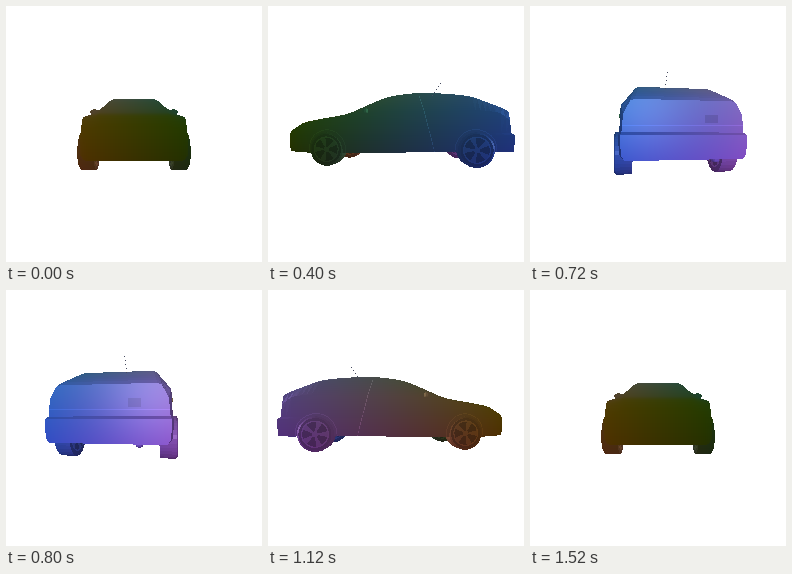
An HTML page with a canvas that plays this animation: 256 by 256 pixels, repeating every 1600 ms.

```html
<!DOCTYPE html>
<html lang="en">
<head>
<meta charset="utf-8">
<title>Turning car</title>
<style>
html, body { margin: 0; width: 100%; height: 100%; overflow: hidden; background: #fff; }
canvas { display: block; width: 100vw; height: 100vh; }
</style>
</head>
<body>
<canvas id="stage" width="256" height="256"></canvas>
<script>
const SIZE = 256, FOCAL = 128 / Math.tan(Math.PI / 6);
const STEP = 80, STEPS = 20, TURN = 2 * Math.PI / (STEPS - 1);
const ctx = document.getElementById('stage').getContext('2d');
const img = ctx.createImageData(SIZE, SIZE);
const px = new Uint32Array(img.data.buffer);
const zbuf = new Float32Array(SIZE * SIZE);

const sub = (a, b) => [a[0] - b[0], a[1] - b[1], a[2] - b[2]];
const dot = (a, b) => a[0] * b[0] + a[1] * b[1] + a[2] * b[2];
const cross = (a, b) => [a[1] * b[2] - a[2] * b[1], a[2] * b[0] - a[0] * b[2], a[0] * b[1] - a[1] * b[0]];
const unit = a => { const l = Math.hypot(...a) || 1; return a.map(v => v / l); };

// Smooth curve through [x, y] points.
function curve(p) {
  const slope = i => {
    const a = p[Math.max(i - 1, 0)], b = p[Math.min(i + 1, p.length - 1)];
    return (b[1] - a[1]) / (b[0] - a[0]);
  };
  return x => {
    let i = 0;
    while (i < p.length - 2 && x > p[i + 1][0]) i++;
    const [x0, y0] = p[i], [x1, y1] = p[i + 1], h = x1 - x0;
    const t = Math.min(1, Math.max(0, (x - x0) / h)), u = 1 - t;
    return u * u * (1 + 2 * t) * y0 + t * u * u * h * slope(i)
      + t * t * (3 - 2 * t) * y1 - t * t * u * h * slope(i + 1);
  };
}

// Axes: x to the car's left, y up, z to its front.
const REAR = -.43, NOSE = .43;
const roof = curve([[-.43, .088], [-.41, .1], [-.36, .122], [-.3, .146], [-.2, .161], [-.1, .166],
  [0, .156], [.06, .138], [.13, .105], [.19, .081], [.3, .062], [.39, .045], [.43, .02]]);
const belt = curve([[-.43, .05], [-.38, .08], [-.2, .082], [.1, .078], [.2, .066], [.35, .04], [.43, .01]]);
const crown = curve([[-.43, .142], [-.36, .13], [-.2, .107], [-.05, .1], [.06, .108], [.15, .128], [.3, .122], [.43, .09]]);
const wide = curve([[-.43, .168], [-.38, .173], [-.2, .175], [.25, .175], [.36, .158], [.41, .14], [.43, .118]]);
const sill = curve([[-.43, -.066], [0, -.07], [.3, -.074], [.43, -.07]]);

const faces = [];
function face(a, b, c, inner, wheel) {
  let n = cross(sub(b, a), sub(c, a));
  if (Math.hypot(...n) < 1e-9) return;
  n = unit(n);
  const mid = [0, 1, 2].map(i => (a[i] + b[i] + c[i]) / 3);
  if (dot(n, sub(mid, inner)) < 0) n = n.map(v => -v);
  faces.push({ pts: [a, b, c], n, wheel });
}
function skin(r, s, inner, wheel) {
  r.forEach((a, i) => {
    const j = (i + 1) % r.length;
    face(a, r[j], s[i], inner, wheel);
    face(r[j], s[j], s[i], inner, wheel);
  });
}
function fan(r, c, inner, wheel) {
  r.forEach((a, i) => face(a, r[(i + 1) % r.length], c, inner, wheel));
}

function section(z) {
  const t = roof(z), b = belt(z), c = crown(z), w = wide(z), f = sill(z);
  const half = [[w * .93, f], [w * .98, f + .012], [w, -.003], [w * .975, Math.min(.004, b - .006)],
    [w * .95, b], [c, t - .004], [c * .92, t]];
  const ring = [...half, [0, t], ...half.map(([x, y]) => [-x, y]).reverse(), [0, f]];
  return ring.map(([x, y]) => [x, y, z < -.39 && y < 0 ? z - .012 : z]);
}

function body() {
  const rings = [];
  for (let i = 0; i <= 48; i++) rings.push(section(REAR + (NOSE - REAR) * i / 48));
  for (let i = 0; i < 48; i++) skin(rings[i], rings[i + 1], [0, .02, rings[i][4][2] * .85]);
  // Tail closed by flat strips from side to side.
  const tail = rings[0];
  for (let i = 0; i < 6; i++) {
    const a = tail[i], b = tail[i + 1], c = tail[14 - i], d = tail[13 - i];
    face(a, b, c, [0, a[1], 0]);
    face(b, c, d, [0, a[1], 0]);
  }
  fan(rings[48], [0, -.015, NOSE + .008], [0, 0, 0]);
}

function wheel(side, z, out) {
  const y = -.058, rad = .064, hub = { y, z, rad };
  const ring = (x, r) => Array.from({ length: 32 }, (_, i) => {
    const a = i * Math.PI / 16;
    return [side * x, y + r * Math.sin(a), z + r * Math.cos(a)];
  });
  const inn = out - .052, core = [side * (out - .03), y, z];
  const edge = ring(out - .005, rad), rim = ring(out, rad * .9), back = ring(inn, rad);
  skin(back, edge, core, hub);
  skin(edge, rim, core, hub);
  fan(rim, [side * out, y, z], core, hub);
  fan(back, [side * inn, y, z], core, hub);
}

function blob(c, r) {
  const ring = k => Array.from({ length: 12 }, (_, i) => {
    const a = i * Math.PI / 6, b = (k / 6 - .5) * Math.PI;
    return [c[0] + r[0] * Math.cos(b) * Math.cos(a), c[1] + r[1] * Math.sin(b), c[2] + r[2] * Math.cos(b) * Math.sin(a)];
  });
  for (let k = 0; k < 6; k++) skin(ring(k), ring(k + 1), c);
}

body();
for (const s of [1, -1]) {
  wheel(s, .252, .177);
  wheel(s, -.305, .185);
  blob([s * .16, .088, .105], [.017, .012, .012]);
}
blob([-.085, -.07, -.42], [.01, .006, .02]);

// Fine marks: spokes, seams and rear panels.
function detail(p, n, hub) {
  const [x, y, z] = p;
  if (hub) {
    const dy = y - hub.y, dz = z - hub.z, r = Math.hypot(dy, dz) / hub.rad;
    if (Math.abs(n[0]) < .9) return .95;
    if (r > .76) return .88;
    if (r > .69) return 1.15;
    return r < .16 || Math.cos(5 * Math.atan2(dy, dz)) > .35 ? 1.1 : .82;
  }
  if (n[2] < -.7 && z < -.4) {
    if (Math.abs(y - .022) < .0014) return 1.12;
    if (x < -.055 && x > -.09 && y > .028 && y < .05) return .88;
  }
  if (Math.abs(n[0]) > .5) {
    if (Math.abs(z + .14 - y * .25) < .0012) return 1.35;
    for (const c of [.252, -.305])
      if (Math.abs(Math.hypot(y + .058, z - c) - .074) < .0016) return 1.15;
  }
  return 1;
}

const LAMP = [0, .25, -2];
function shade(p, n, eye, hub) {
  const l = unit(sub(LAMP, p)), nl = dot(n, l);
  let lit = .5, gloss = 0;
  if (nl > 0) {
    lit += .3 * nl;
    const v = unit(sub(eye, p)), r = n.map((k, i) => 2 * nl * k - l[i]);
    gloss = 34 * Math.pow(Math.max(0, dot(r, v)), 20);
  }
  lit *= 255 * detail(p, n, hub);
  const r = lit * (.23 + .43 * (.18 - p[0]) / .36) + gloss;
  const g = lit * (.33 + .27 * (p[1] + .122) / .288) + gloss;
  const b = lit * .95 * Math.max(0, .43 - p[2]) / .86 + gloss;
  return pack(r, g, b);
}
const pack = (r, g, b) => (255 << 24 | Math.min(255, b) << 16 | Math.min(255, g) << 8 | Math.min(255, r)) >>> 0;

function render(angle) {
  const s = Math.sin(angle), c = Math.cos(angle), eye = [s, 0, c];
  const project = ([x, y, z]) => {
    const d = 1 - x * s - z * c;
    return [128 + FOCAL * (x * c - z * s) / d, 128 - FOCAL * y / d, 1 / d];
  };
  px.fill(0xffffffff);
  zbuf.fill(0);
  for (const { pts, n, wheel } of faces) {
    if (dot(n, sub(eye, pts[0])) <= 0) continue;
    const [a, b, d] = pts.map(project);
    const area = (b[0] - a[0]) * (d[1] - a[1]) - (b[1] - a[1]) * (d[0] - a[0]);
    if (Math.abs(area) < 1e-6) continue;
    const lo = k => Math.max(0, Math.floor(Math.min(a[k], b[k], d[k])));
    const hi = k => Math.min(SIZE - 1, Math.ceil(Math.max(a[k], b[k], d[k])));
    const x0 = lo(0), x1 = hi(0), y0 = lo(1), y1 = hi(1);
    for (let y = y0; y <= y1; y++) for (let x = x0; x <= x1; x++) {
      const qx = x + .5 - a[0], qy = y + .5 - a[1];
      const v = (qx * (d[1] - a[1]) - qy * (d[0] - a[0])) / area;
      const w = ((b[0] - a[0]) * qy - (b[1] - a[1]) * qx) / area;
      const u = 1 - v - w;
      if (u < -1e-6 || v < -1e-6 || w < -1e-6) continue;
      const inv = u * a[2] + v * b[2] + w * d[2], i = y * SIZE + x;
      if (inv <= zbuf[i]) continue;
      zbuf[i] = inv;
      const k = [u * a[2] / inv, v * b[2] / inv, w * d[2] / inv];
      const p = [0, 1, 2].map(j => k[0] * pts[0][j] + k[1] * pts[1][j] + k[2] * pts[2][j]);
      px[i] = shade(p, n, eye, wheel);
    }
  }
  // Thin aerial, broken into dots; only its tip shows from ahead.
  for (let k = 0; k <= 4; k++) {
    const t = k / 4, q = project([0, .172 + .05 * t, -.165 - .035 * t]);
    if (q[2] > 1 || (k === 4 && q[2] > .88)) px[Math.floor(q[1]) * SIZE + Math.floor(q[0])] = pack(70, 75, 95);
  }
  ctx.putImageData(img, 0, 0);
}

let shown = -1;
function tick() {
  const step = Math.floor(performance.now() / STEP) % STEPS;
  if (step !== shown) render((shown = step) * TURN);
  requestAnimationFrame(tick);
}
tick();
</script>
</body>
</html>
```
